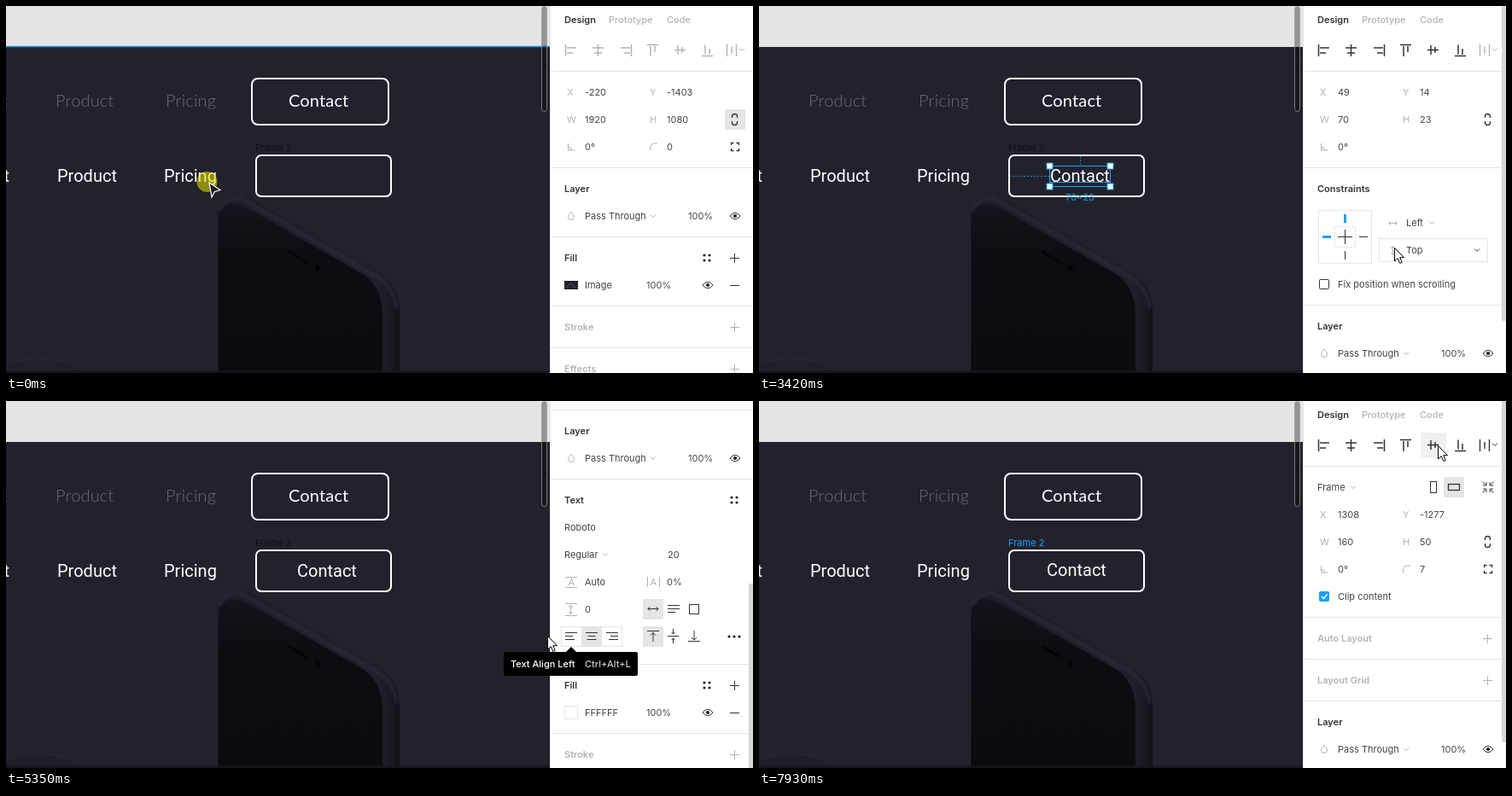
These frames come from a looping animation (875 px wide and 430 px high, 8000 ms). An HTML page:

```html
<!DOCTYPE html>
<html lang="en">
<head>
<meta charset="utf-8">
<title>Design panel</title>
<style>
html, body { margin: 0; width: 100%; height: 100%; overflow: hidden; background: #fff; }
svg { display: block; width: 875px; height: 430px; }
text { font: 11px Inter, sans-serif; fill: #444; white-space: pre; }
.h { font-weight: 600; fill: #333; }
.off { font-weight: 600; fill: #b3b3b3; }
.lab { fill: #b3b3b3; }
.blue { fill: #18a0fb; }
.dim { fill: #101016; }
.nav { font: 20px Roboto, sans-serif; fill: #fff; }
.thin { font: 300 20px Lato, sans-serif; letter-spacing: .15px; fill: #6b6b76; }
.thin.lit { font-weight: 400; fill: #fff; }
.ln { fill: none; stroke: #333; }
.soft { fill: none; stroke: #b3b3b3; }
.edge { fill: none; stroke: #e5e5e5; }
.sel { fill: none; stroke: #18a0fb; }
.knob { fill: #fff; stroke: #18a0fb; }
.on { fill: #e5e5e5; }
.hover { fill: #f0f0f0; }
</style>
</head>
<body>
<svg id="stage" viewBox="0 0 875 430"></svg>
<script>
const LOOP = 8000;

// Small markup helpers
const text = (x, y, s, cls = '', more = '') => `<text x="${x}" y="${y + 4}" class="${cls}" ${more}>${s}</text>`;
const path = (d, cls = 'ln', more = '') => `<path d="${d}" class="${cls}" ${more}/>`;
const rect = (x, y, w, h, cls, more = '') => `<rect x="${x}" y="${y}" width="${w}" height="${h}" class="${cls}" ${more}/>`;
const during = (spans, ...parts) => `<g data-on="${spans}">${parts.join('')}</g>`;
const at = (x, y, s) => `<g transform="translate(${x} ${y})">${s}</g>`;
const rule = y => path(`M638 ${y + .5}H875`, 'edge');

// Icons
const chevron = (x, y, cls = 'soft') => path(`M${x - 3} ${y - 1.5}l3 3 3-3`, cls);
const plus = (y, cls = 'ln') => path(`M848 ${y + .5}h11M853.5 ${y - 5}v11`, cls);
const minus = y => path(`M848 ${y - .5}h11`);
const eye = (x, y) => at(x, y, path('M-6 0Q0-7.5 6 0Q0 7.5-6 0Z') + '<circle r="2.1" fill="#222"/>');
const dots = (x, y) => at(x, y, [[-3, -3], [3, -3], [-3, 3], [3, 3]].map(p => `<circle cx="${p[0]}" cy="${p[1]}" r="1.6" fill="#222"/>`).join(''));
const more = y => [-6, 0, 6].map(d => `<circle cx="${853 + d}" cy="${y}" r="1.6" fill="#222"/>`).join('');
const drop = y => path(`M662 ${y - 5}Q665.500 ${y - 1} 665.500 ${y + 1}A3.500 3.500 0 0 1 658.500 ${y + 1}Q658.500 ${y - 1} 662 ${y - 5}Z`, 'soft');
const link = y => path(`M850.500 ${y - 2}v-1.500a3 3 0 0 1 6 0v1.500M850.500 ${y + 2}v1.500a3 3 0 0 0 6 0v-1.500`, 'ln', 'stroke-width="1.3"');
const angle = y => path(`M658.5 ${y - 4}v8h8M658.5 ${y}q4 0 4 4`, 'soft');
const corner = y => path(`M754.5 ${y + 4}v-2q0-6 6-6h2.500`, 'soft');
const corners = y => path(`M849.500 ${y - 2}v-2.500h3M855.500 ${y - 4.5}h3v2.500M858.500 ${y + 2}v2.500h-3M852.500 ${y + 4.5}h-3v-2.500`, 'ln', 'stroke-width="1.3"');
const shrink = y => at(854, y, [0, 90, 180, 270].map(a => path('M-6.500-6.500L-2.500-2.500M-2-6v4h-4', 'ln', `transform="rotate(${a})"`)).join(''));
const lines = (x, y, a, b) => path(`M${x - 7} ${y - 4.5}h14M${x - 7 + a} ${y - .5}h9M${x - 7 + b} ${y + 3.5}h11`);

const aligns = [
  'M655.5 45v14M657 49h11M657 55h7',
  'M693.500 45v14M687 49h13M689 55h9',
  'M732.500 45v14M720 49h11M724 55h7',
  'M751 45.500h13M755 47v12M760 47v7',
  'M783 51.500h13M787 46v11M792 48v7',
  'M815 58.500h13M819 45.500v11M824 50v7'
].join('');
const spread = 'M844.500 45v14M855.500 45v14M850 48v8';

const alignRow = cls => path(aligns, cls, 'stroke-width="1.5"');
const spreadIcon = cls => path(spread, cls, 'stroke-width="1.4"') + chevron(862, 51, cls);

// Panel rows
const pair = (y, a, va, b, vb) => text(657, y, a, 'lab') + text(678, y, va) + text(754, y, b, 'lab') + text(774, y, vb);
const layer = (y, boxed = '') => text(654, y, 'Layer', 'h') + boxed + drop(y + 32) + text(678, y + 32, 'Pass Through')
  + text(799, y + 32, '100%') + eye(854, y + 32);
const closed = (y, name) => rule(y - 25) + text(654, y, name, 'off') + plus(y, 'soft');
const fill = (y, swatch, name) => rule(y - 25) + text(654, y, 'Fill', 'h') + dots(821, y) + plus(y) + swatch
  + text(678, y + 32, name) + text(750, y + 32, '100%') + eye(822, y + 32) + minus(y + 33);

const imagePanel = pair(101, 'X', '-220', 'Y', '-1403') + pair(133, 'W', '1920', 'H', '1080')
  + rect(842, 121, 24, 24, 'on', 'rx="1"') + link(133)
  + angle(165) + text(678, 165, '0°') + corner(165) + text(774, 165, '0') + corners(165)
  + rule(189) + layer(214) + chevron(758, 246)
  + fill(295, rect(654, 322, 16, 10, '', 'fill="#22222c"') + path('M656 330l5-5 6 5', 'ln', 'style="stroke:#55505c"'), 'Image')
  + closed(376, 'Stroke') + closed(425, 'Effects');

const emptyPanel = text(654, 101, 'Background', 'h') + rect(654.5, 125.5, 15, 15, 'on')
  + text(678, 133, 'E5E5E5') + text(750, 133, '100%') + eye(854, 133) + closed(182, 'Export');

const constraints = text(654, 214, 'Constraints', 'h') + rect(655.5, 239.5, 62, 62, 'edge')
  + rect(674.5, 258.5, 24, 24, 'soft', 'stroke-dasharray="2 2" opacity=".6"')
  + path('M678 270.500h17M686.500 262v17M703 270.500h10M686.500 287v10')
  + path('M660 270.500h10M686.500 244v10', 'sel', 'stroke-width="3"')
  + path('M738 254.500h9M740 252l-2.500 2.500 2.500 2.500M745 252l2.500 2.500-2.500 2.500', 'soft')
  + text(758, 254, 'Left') + chevron(788, 254)
  + during('3340-3500', rect(726.5, 272.5, 127, 27, 'edge'), chevron(841, 286, 'ln'))
  + path('M742.500 282v9M740 284l2.500-2.500 2.500 2.500M740 289l2.500 2.500 2.500-2.500', 'soft')
  + text(758, 286, 'Top') + during('0-3340 3500-8000', chevron(786, 286))
  + rect(656.5, 320.5, 11, 11, 'ln', 'rx="1"') + text(678, 326, 'Fix position when scrolling');

const typeRows = rule(431) + text(654, 456, 'Text', 'h') + dots(853, 456)
  + text(654, 488, 'Roboto') + text(654, 520, 'Regular') + chevron(702, 520) + text(775, 520, '20')
  + path('M655 546.500h14M655 558.500h14', 'soft') + text(658.5, 552, 'A', 'lab') + text(678, 552, 'Auto')
  + path('M751.500 546v12M765.500 546v12', 'soft') + text(754.5, 552, 'A', 'lab') + text(774, 552, '0%')
  + path('M655 577.500h14M655 591.500h14M661.500 580v9M659 582l2.500-2.500 2.500 2.500M659 587l2.500 2.500 2.500-2.500', 'soft') + text(678, 584, '0')
  + rect(746, 572, 24, 24, 'on') + path('M752 583.500h12M754.500 581l-2.500 2.500 2.500 2.500M761.500 581l2.500 2.500-2.500 2.500')
  + path('M775 579.500h14M775 583.500h14M775 587.500h9') + rect(800.5, 578.500, 11, 11, 'ln')
  + during('0-4960', rect(650, 604, 24, 24, 'on')) + during('4960-8000', rect(674, 604, 24, 24, 'on'))
  + during('4960-5510', rect(650.5, 604.5, 71, 23, 'edge'))
  + during('3970-4270', rect(746.5, 604.5, 71, 23, 'edge'))
  + lines(662, 616, 0, 0) + lines(686, 616, 2.5, 1.5) + lines(710, 616, 5, 3)
  + rect(746, 604, 24, 24, 'on')
  + path('M751 609.500h14M758 611v11M755 614.500l3-3 3 3M775 615.500h13M781.500 607v6M779.500 611l2 2 2-2M781.500 618v6M779.500 620l2-2 2 2M799 621.500h14M806 609v11M803 617l3 3 3-3')
  + more(616)
  + fill(673, rect(654.5, 697.5, 15, 15, 'edge'), 'FFFFFF')
  + closed(754, 'Stroke') + closed(803, 'Effects');

const geometry = (x, y, w) => pair(101, 'X', x, 'Y', y) + pair(133, 'W', w, 'H', 23);
const textPanel = during('860-1700', geometry(1201, -1264, 62))
  + during('1700-5510', pair(101, 'X', 49, 'Y', 14), text(657, 133, 'W', 'lab'), text(678, 133, '', '', 'id="width"'), text(754, 133, 'H', 'lab'), text(774, 133, '23'))
  + link(133) + angle(165) + text(678, 165, '0°') + rule(189) + constraints
  + rule(350) + layer(375) + chevron(758, 407) + typeRows;

const framePanel = text(654, 101, 'Frame') + chevron(696, 101) + rect(786.5, 94.5, 7, 13, 'ln')
  + rect(802, 89, 24, 24, 'on') + rect(807.5, 97.5, 13, 7, 'ln', 'stroke-width="1.3"') + shrink(101)
  + pair(133, 'X', '1308', 'Y', '-1277') + pair(165, 'W', '160', 'H', '50') + link(165)
  + angle(197) + text(678, 197, '0°') + corner(197) + text(774, 197, '7') + corners(197)
  + rect(656, 223, 12, 12, 'blue', 'rx="2"') + path('M659 229l2.500 2.500 4-5', 'ln', 'style="stroke:#fff;stroke-width:1.5"')
  + text(678, 229, 'Clip content')
  + closed(278, 'Auto Layout') + closed(327, 'Layout Grid') + rule(351)
  + layer(376, during('5670-5830', rect(646.5, 394.5, 135, 27, 'edge'), chevron(769, 408, 'ln')))
  + during('0-5670 5830-8000', chevron(758, 408));

const panel = rect(638, 0, 237, 430, '', 'fill="#fff"') + `<g id="scroll">`
  + during('6690-7400', rect(678, 37, 30, 30, 'hover', 'rx="2"'))
  + during('7700-8000', rect(775, 37, 30, 30, 'hover', 'rx="2"'))
  + text(654, 16, 'Design', 'h') + text(706, 16, 'Prototype', 'off', 'style="font-weight:500"') + text(774, 16, 'Code', 'off', 'style="font-weight:500"')
  + during('0-860 1700-2660', alignRow('soft')) + during('860-1700 2660-8000', alignRow('ln'))
  + during('0-5510', spreadIcon('soft')) + during('5510-8000', spreadIcon('ln')) + rule(76)
  + during('0-80', imagePanel) + during('80-860', emptyPanel)
  + during('860-5510', textPanel) + during('5510-8000', framePanel) + '</g>'
  + during('2990-5510', rect(870, 0, 5, 369, '', 'id="thumb" fill="#d6d6d6" rx="2"'))
  + during('5510-8000', rect(870, -4, 5, 404, '', 'fill="#d6d6d6" rx="2"'))
  + path('M637.5 0V430', 'edge');

// Canvas with the page design
const phone = path('M248 430V243Q248 222 273 222Q281 222 290 227L436 312Q461 327 461 358V430Z', '', 'fill="url(#rim)"')
  + path('M248.500 430V250Q249 231 267 232Q276 233 288 240L416 313Q440 327 441 360V430Z', '', 'fill="url(#glass)"')
  + path('M250 240Q255 224 275 225L434 317Q455 329 458 355', 'ln', 'style="stroke:#2e2e3c;stroke-width:5;opacity:.55" filter="url(#blur)"')
  + path('M332 288l20 12', 'ln', 'style="stroke:#050508;stroke-width:3;stroke-linecap:round"')
  + '<ellipse cx="365" cy="307" rx="2.500" ry="4" transform="rotate(-25 365 307)" fill="#040407"/>';

const knobs = (x, y, w, h) => [[x, y], [x + w, y], [x, y + h], [x + w, y + h]].map(p => rect(p[0] - 3.5, p[1] - 3.5, 7, 7, 'knob')).join('');
const picked = (x, y, w, h) => rect(x, y, w, h, 'sel') + knobs(x, y, w, h);
const size = (x, y, s) => text(x, y, s, 'blue', 'text-anchor="middle"');

const canvas = rect(0, 0, 637, 430, '', 'fill="#e5e5e5"') + rect(0, 48, 637, 382, '', 'fill="#22222d"')
  + '<ellipse cx="38" cy="453" rx="67" ry="40" fill="#20202a" stroke="#2b2b37"/>'
  + phone + rect(0, 427, 637, 3, '', 'fill="#18141c" opacity=".8"')
  + during('0-80', path('M0 47.500H637', 'sel', 'stroke-width="1.5"'))
  + text(2, 114, 't', 'thin', 'text-anchor="end"') + text(58, 114, 'Product', 'thin') + text(187, 114, 'Pricing', 'thin')
  + text(331, 114, 'Contact', 'thin lit') + rect(288, 85, 160, 54, '', 'rx="7" fill="none" stroke="#fff" stroke-width="2"')
  + text(4, 202, 't', 'nav', 'text-anchor="end"') + text(60, 202, 'Product', 'nav') + text(185, 202, 'Pricing', 'nav')
  + rect(293, 175, 158, 48, '', 'rx="6" fill="none" stroke="#fff" stroke-width="2"')
  + during('0-5510', text(292, 166, 'Frame 2', 'dim')) + during('5510-8000', text(292, 166, 'Frame 2', 'blue'))
  + during('860-1090', picked(184.5, 187.5, 62, 24), size(216, 224, '62×23'))
  + during('860-1410', path('M185 208.500h62', 'sel'))
  + during('1410-1700', rect(292, 174, 160, 50, 'sel', 'rx="7" stroke-width="2"'))
  + text(341, 202, '', 'nav', 'id="label"')
  + during('1700-2660', '<g id="editing">' + rect(340.5, 187.5, 14, 24, '', 'id="field" fill="none" stroke="#5d7388"')
    + path('M340.5 187v25', 'sel') + '</g>', rect(354, 188, 2, 23, '', 'id="caret" fill="#aaa"'))
  + during('2660-4960', path('M294 199.500H340M376.500 176V187', 'sel', 'stroke-dasharray="2 2" opacity=".8"'),
    path('M341 206.500h70', 'sel'), picked(340.5, 187.5, 71, 24), size(376, 224, '70×23'))
  + during('5510-6690', rect(292, 174, 160, 50, 'sel', 'stroke-width="1.5"'), knobs(292, 174, 160, 50), size(372, 237, '160×50'))
  + rect(627.5, .5, 6, 123, '', 'rx="3" fill="#000" fill-opacity=".35" stroke="#999" stroke-opacity=".75"');

const tip = during('5350-5430', path('M656 294l6-6 6 6Z', '', 'fill="#000"'), rect(583, 294, 157, 28, '', 'rx="2" fill="#000"'),
  text(591, 308, 'Text Align Left', '', 'style="fill:#fff;font-weight:500"'), text(678, 308, 'Ctrl+Alt+L', '', 'style="fill:#ccc;font-weight:500"'));

const pointer = '<g id="pointer">'
  + during('0-230 640-930 1700-1860 4960-5040 5510-5590 6690-6770 7770-7850', '<circle cx="-2.500" cy="-1" r="12" fill="#e8e800" opacity=".55"/>')
  + '<path id="dart" d="M0 0L13 8.500L6.500 10.500L3 17Z" fill="#1b1b22" stroke="#fff" stroke-width="1.2"/>'
  + '<path id="arrow" d="M.5 .5V16L4.200 12.600L6.800 18.500L9.200 17.400L6.700 11.700H11.500Z" fill="#fff" stroke="#000"/></g>';

const stage = document.getElementById('stage');
stage.innerHTML = `<defs>
<linearGradient id="rim" x1="0" x2="1"><stop offset="0" stop-color="#1d1d28"/><stop offset=".88" stop-color="#20202b"/><stop offset=".95" stop-color="#1a1a23"/><stop offset="1" stop-color="#101016"/></linearGradient>
<linearGradient id="glass" x1="0" x2="0" y1="0" y2="1"><stop offset="0" stop-color="#14141c"/><stop offset=".3" stop-color="#0d0c12"/><stop offset="1" stop-color="#0c0b10"/></linearGradient>
<filter id="blur"><feGaussianBlur stdDeviation="1.500"/></filter></defs>` + canvas + panel + tip + pointer;

// Motion
const route = [[0, 238, 207], [230, 238, 207], [710, 224, 201], [1410, 224, 201], [1540, 345, 204], [1999, 345, 204],
  [2000, 544, 216], [2350, 544, 216], [2660, 590, 281], [2990, 590, 281], [3420, 744, 283], [3970, 744, 283],
  [4430, 692, 275], [5270, 692, 275], [5350, 634, 275], [5400, 634, 275], [5510, 452, 216], [5590, 452, 216],
  [5670, 735, 388], [5750, 760, 144], [5820, 760, 144], [6150, 760, 96], [6230, 760, 96], [6400, 648, 66],
  [6540, 698, 54], [7250, 698, 54], [7700, 795, 52], [8000, 795, 52]];
const scrolling = [[0, 0], [3430, 0], [3730, 337], [3800, 337], [3810, 340], [5509, 340], [5510, 0], [8000, 0]];
const typing = [[2000, 'C', 14], [2180, 'Co', 25], [2350, 'Con', 36], [2430, 'Cont', 43], [2510, 'Conta', 53], [2590, 'Contac', 63], [2660, 'Contact', 70]];

function along(keys, t) {
  let i = 1;
  while (i < keys.length - 1 && keys[i][0] <= t) i++;
  const a = keys[i - 1], b = keys[i], k = (t - a[0]) / (b[0] - a[0]);
  return a.slice(1).map((v, n) => v + (b[n + 1] - v) * k);
}

const $ = id => document.getElementById(id);
const set = (id, name, value) => $(id).setAttribute(name, value);
const show = (node, yes) => node.setAttribute('display', yes ? 'inline' : 'none');
const timed = [...stage.querySelectorAll('[data-on]')].map(node =>
  [node, node.dataset.on.split(' ').map(s => s.split('-').map(Number))]);

function draw(t) {
  for (const [node, spans] of timed) show(node, spans.some(([a, b]) => t >= a && t < b));

  const [, word, w] = typing.filter(k => k[0] <= t).pop() || [0, '', 0];
  $('label').textContent = word;
  $('width').textContent = w;
  set('label', 'x', t < 6690 ? 341 : 337);
  set('label', 'y', t < 7770 ? 206 : 205);
  set('field', 'width', w);
  set('caret', 'x', 340 + w);

  const [y] = along(scrolling, t);
  set('scroll', 'transform', `translate(0 ${-Math.round(y)})`);
  set('thumb', 'y', y * .629);

  const [px, py] = along(route, t).map(Math.round);
  set('pointer', 'transform', `translate(${px} ${py})`);
  show($('dart'), px < 632);
  show($('arrow'), px >= 632);
}

const start = performance.now();
function tick(now) {
  draw(Math.max(0, now - start) % LOOP);
  requestAnimationFrame(tick);
}
draw(0);
requestAnimationFrame(tick);
</script>
</body>
</html>
```
